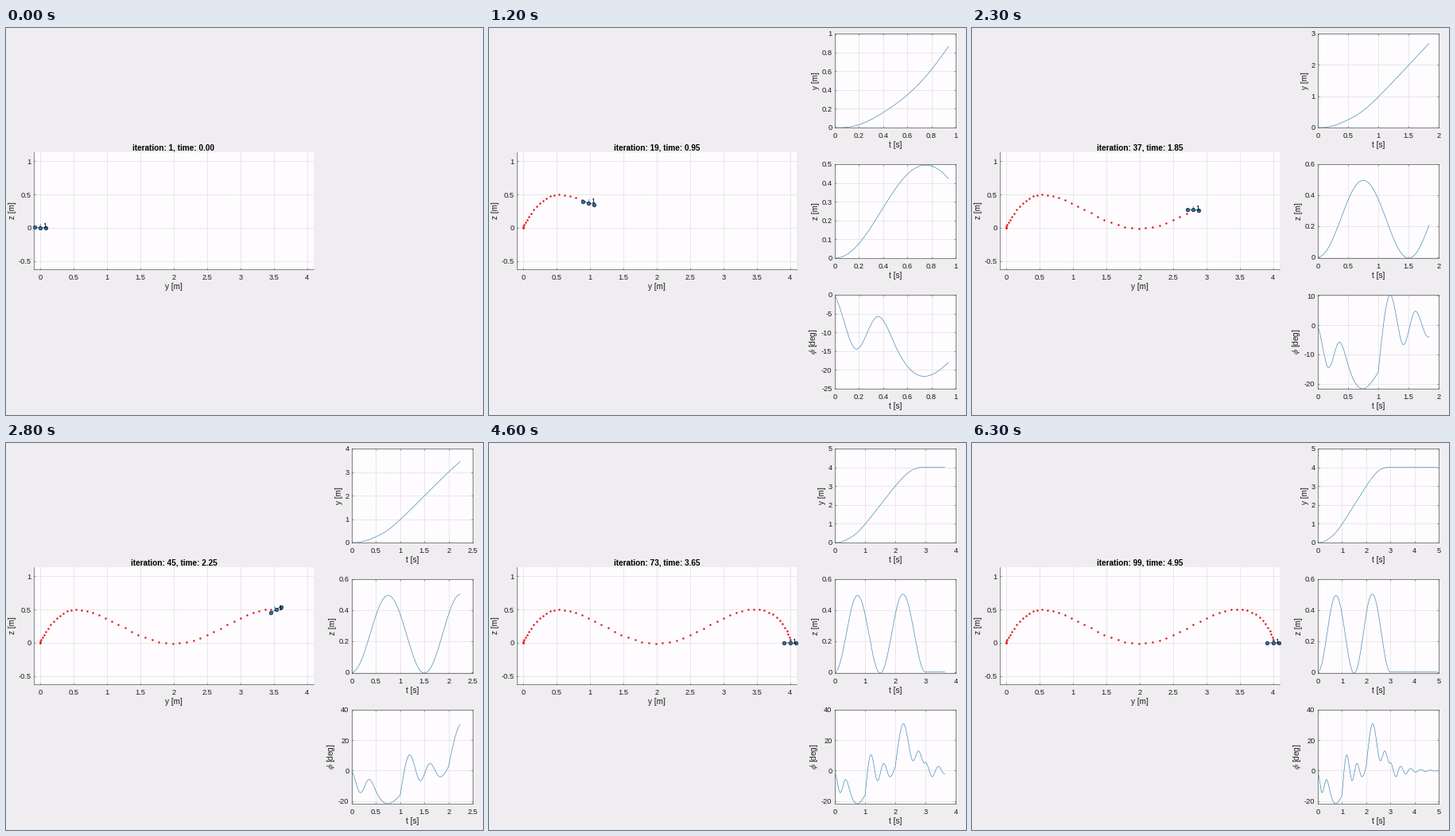
Recreate the animation shown at these times as a matplotlib script. Size 600 by 486 pixels, loop 6.4 s.

```python
import math

import matplotlib.pyplot as plt
import numpy as np
from matplotlib.animation import FuncAnimation

W, H, DPI = 600, 486, 72
FRAMES, INTERVAL = 64, 100
STEP = 0.05          # seconds of flight per iteration
ARM = 0.0865         # metres from hub to rotor
HALF = 0.75          # seconds between turning points in height

BACK, PANEL, GRID = "#efedef", "#fefcfe", "#e4e2e5"
INK, EDGE, CURVE = "#1c1c1c", "#555555", "#3f86b4"

plt.rcParams.update({
    "font.family": "Liberation Sans",
    "mathtext.fontset": "stix",
    "text.color": INK,
})


def spline(points, t):
    """Natural cubic spline through the given points."""
    x, y = np.array(points).T
    n, h = len(x), np.diff(x)
    a, rhs = np.eye(n), np.zeros(n)
    for i in range(1, n - 1):
        a[i, i - 1:i + 2] = h[i - 1], 2 * (h[i - 1] + h[i]), h[i]
    rhs[1:-1] = 6 * np.diff(np.diff(y) / h)
    m = np.linalg.solve(a, rhs)
    i = np.clip(np.searchsorted(x, t, side="right") - 1, 0, n - 2)
    left, right, w = x[i + 1] - t, t - x[i], h[i]
    return ((m[i] * left**3 + m[i + 1] * right**3) / (6 * w)
            + (y[i] / w - m[i] * w / 6) * left
            + (y[i + 1] / w - m[i + 1] * w / 6) * right)


def ease(a, b, u):
    return a + (b - a) * (1 - np.cos(math.pi * u)) / 2


def forward(t):
    """Speed up for a second, cruise, slow down, then settle at 4 m."""
    keys = [(0, 0), (.1, .0035), (.2, .0305), (.4, .16), (.75, .54),
            (1, .977), (1.5, 1.985), (2, 3), (2.5, 3.8), (2.8, 3.99),
            (3, 4.007)]
    settle = 4 + .007 * np.exp(-3 * (t - 3))
    return np.maximum(np.where(t < 3, spline(keys, t), settle), 0)


def height(t):
    """Two humps, eased from one turning point to the next."""
    turns = np.array([0, .495, -.007, .503, 0, 0, 0, 0])
    i = (t / HALF).astype(int)
    u = t / HALF - i
    return ease(turns[i], turns[i + 1], u**1.02)


def roll(t):
    """Swings restart at each whole second, then ring down."""
    swings = [
        [(0, 0), (.05, -4.3), (.165, -14.3), (.345, -5.9), (.5, -13.5),
         (.7, -21.5), (1, -16.1)],
        [(1, -16.1), (1.2, 10.4), (1.41, -6.6), (1.595, 4.5), (1.79, -3.4),
         (2, 2.6)],
        [(2, 2.6), (2.3, 30.4), (2.58, 6.5), (2.77, 13), (2.96, 4.9),
         (3, 5.4)],
    ]
    late = t - 3.23
    ring = -4 * np.exp(-1.6 * late) * np.cos(2 * math.pi * late / .41)
    phi = np.where(late < 0, ease(5.4, -4, (t - 3) / .23), ring)
    for second, keys in enumerate(swings):
        on = t.astype(int) == second
        phi[on] = spline(keys, t[on])
    return phi


def auto_axis(lo, hi):
    """At most five tick steps; a side that would sit too loose is cut tight."""
    eps = 1e-9
    base = math.floor(math.log10(hi - lo)) - 1
    for step in (m * 10.0**e for e in range(base, base + 3) for m in (1, 2, 5)):
        first, last = math.floor(lo / step + eps), math.ceil(hi / step - eps)
        if last - first <= 5:
            break
    slack = 0.2499 * (hi - lo)
    low = first * step if lo - first * step < slack else lo
    high = last * step if last * step - hi < slack else hi
    ticks = np.arange(math.ceil(low / step - eps),
                      math.floor(high / step + eps) + 1) * step
    return low, high, ticks


def labels(ticks):
    return [f"{round(v, 9) + 0:g}" for v in ticks]


def make_axes(x0, y0, x1, y1, xlabel, ylabel):
    ax = fig.add_axes([x0 / W, 1 - y1 / H, (x1 - x0) / W, (y1 - y0) / H],
                      facecolor=PANEL)
    ax.set_axisbelow(True)
    ax.grid(color=GRID, lw=0.8)
    ax.tick_params(direction="in", length=2.2, width=0.6, color=EDGE,
                   labelcolor=INK, labelsize=9.2)
    ax.tick_params(axis="x", pad=5.5)
    ax.tick_params(axis="y", pad=3.5)
    for spine in ax.spines.values():
        spine.set(color=EDGE, linewidth=0.7)
    ax.set_xlabel(xlabel, fontsize=10, labelpad=3, color=INK)
    ax.set_ylabel(ylabel, fontsize=10, labelpad=2.5, color=INK)
    return ax


fig = plt.figure(figsize=(W / DPI, H / DPI), dpi=DPI, facecolor=BACK)

# Flight view
view = make_axes(35, 156, 387, 303, "y [m]", "z [m]")
view.spines[["top", "right"]].set_visible(False)
xt, zt = np.arange(0, 4.1, 0.5), np.arange(-0.5, 1.1, 0.5)
view.set_xticks(xt, labels(xt))
view.set_yticks(zt, labels(zt))
view.set_xlim(-0.0953, 4.1)
view.set_ylim(-0.6198, 1.1323)
title = fig.text(211 / W, 1 - 153 / H, "", ha="center", va="baseline",
                 fontsize=10, weight="bold", color="black")
trail, = view.plot([], [], "o", ms=2.5, mew=0, color="#e0141c", zorder=3)
thrust, = view.plot([], [], color="#3f7fb8", lw=0.9, zorder=4, clip_on=False)
body, = view.plot([], [], "-o", color="#2a4a68", lw=0.8, ms=4.4, mew=0.8,
                  mfc="#2f6fae", mec="#1a2c40", zorder=5, clip_on=False)
tag = view.text(0, 0, "1", fontsize=9, color="black", zorder=6)

# State histories
clock = np.arange(501) / 100
data = [forward(clock), height(clock), roll(clock)]
plots = []
for i, name in enumerate(("y [m]", "z [m]", r"$\phi$ [deg]")):
    top = 7 + 164 * i
    ax = make_axes(435, top, 587, top + 118, "t [s]", name)
    ax.tick_params(top=True, right=True)
    line, = ax.plot([], [], color=CURVE, lw=0.65, zorder=3)
    power = ax.text(0, 1.02, "", transform=ax.transAxes, fontsize=8)
    plots.append((ax, line, power))


def update_plot(plot, values, n):
    ax, line, power = plot
    line.set_data(clock[:n], values[:n])
    low, high, ticks = auto_axis(0, clock[n - 1])
    ax.set_xticks(ticks, labels(ticks))
    ax.set_xlim(low, high)
    low, high, ticks = auto_axis(values[:n].min(), values[:n].max())
    tiny = max(abs(low), abs(high)) < 0.00999
    ax.set_yticks(ticks, labels(ticks * 1000 if tiny else ticks))
    ax.set_ylim(low, high)
    power.set_text(r"×10$^{-3}$" if tiny else "")


def draw(frame):
    k = min(round(1.595 * frame), frame + 36)
    title.set_text(f"iteration: {max(k, 1)}, time: {k * STEP:.2f}")

    past = np.arange(k + 1) * 5
    trail.set_data(data[0][past], data[1][past])
    now = (k + 1) * 5
    y, z = data[0][now], data[1][now]
    angle = math.radians(data[2][now])
    c, s = math.cos(angle), math.sin(angle)
    arm = np.array([-ARM, 0, ARM])
    body.set_data(y + arm * c, z + arm * s)
    thrust.set_data([y, y - 0.05 * s], [z, z + 0.05 * c])
    tag.set_position((y + 0.036, z - 0.008))

    for plot, values in zip(plots, data):
        plot[0].set_visible(k > 0)
        if k > 0:
            update_plot(plot, values, 5 * k)
    return []


anim = FuncAnimation(fig, draw, frames=FRAMES, interval=INTERVAL,
                     init_func=lambda: draw(0), repeat=True, repeat_delay=0,
                     blit=False)
plt.show()
```
